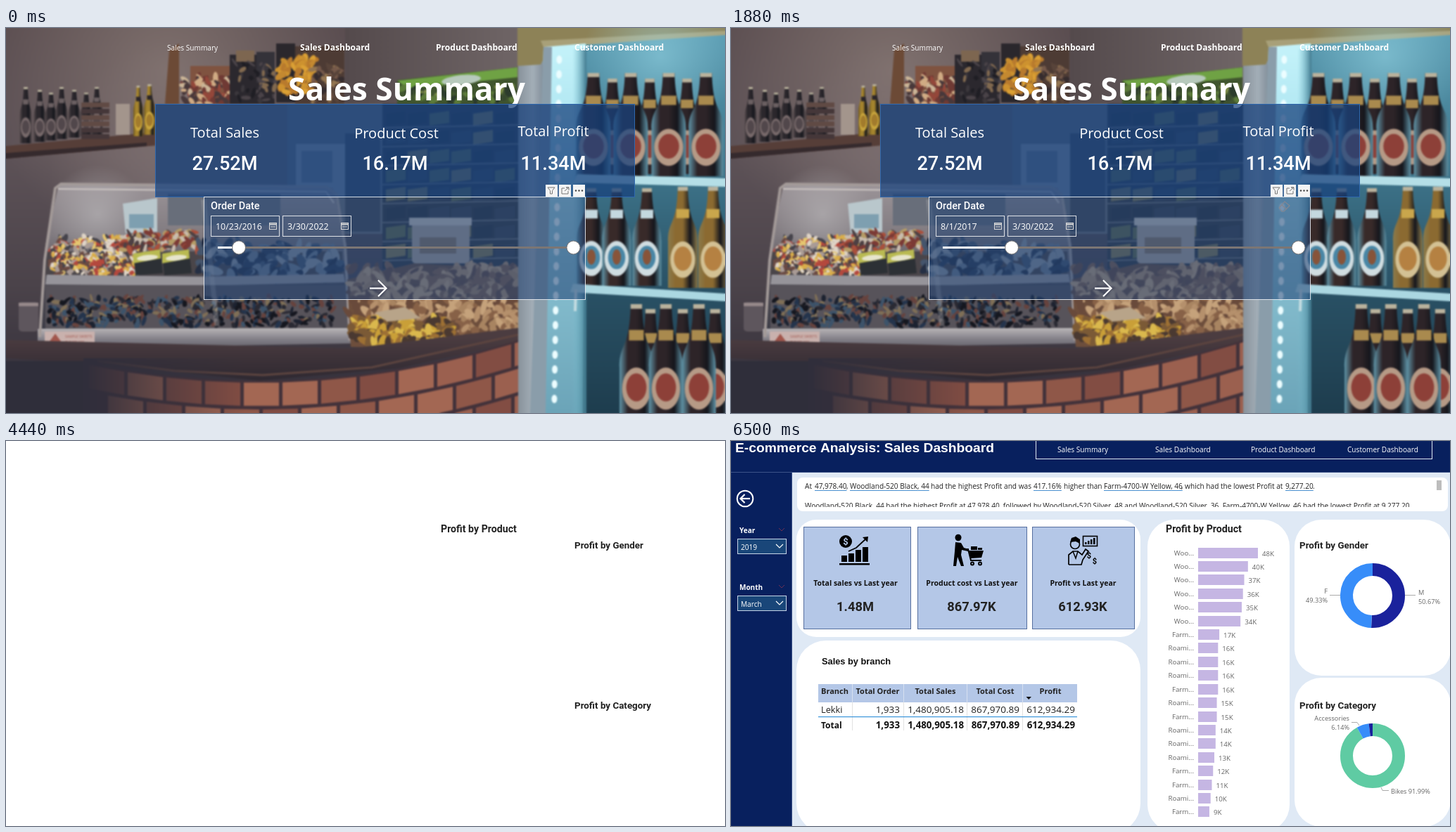
Write an HTML page with a canvas that moves like this. It is 1022 by 548 pixels and loops after 8000 ms.

```html
<!DOCTYPE html>
<html lang="en">
<head>
<meta charset="utf-8">
<title>Sales dashboard</title>
<style>
  html, body { margin: 0; width: 100%; height: 100%; overflow: hidden; background: #fff; }
  canvas { display: block; width: 100vw; height: 100vh; }
</style>
</head>
<body>
<canvas id="stage" width="1022" height="548"></canvas>
<script>
const W = 1022, H = 548, LOOP = 8000;
const SANS = '"Open Sans", sans-serif', DIN = 'Roboto, sans-serif', ARIAL = '"Liberation Sans", sans-serif';
const stage = document.getElementById('stage').getContext('2d');
let c = stage;

// Drawing helpers
function rect(x, y, w, h, fill) { c.fillStyle = fill; c.fillRect(x, y, w, h); }
function frame(x, y, w, h, color, width = 1) {
  c.strokeStyle = color; c.lineWidth = width; c.strokeRect(x + .5, y + .5, w, h);
}
function round(x, y, w, h, r, fill) {
  c.fillStyle = fill; c.beginPath(); c.roundRect(x, y, w, h, r); c.fill();
}
function trace(pts) {
  c.beginPath();
  for (let i = 0; i < pts.length; i += 2) c.lineTo(pts[i], pts[i + 1]);
}
function poly(pts, fill) { trace(pts); c.fillStyle = fill; c.fill(); }
function line(pts, color, width = 1) { trace(pts); c.strokeStyle = color; c.lineWidth = width; c.stroke(); }
function oval(x, y, rx, ry, fill, turn = 0) {
  c.fillStyle = fill; c.beginPath(); c.ellipse(x, y, rx, ry, turn, 0, 7); c.fill();
}
function ring(x, y, r, color, width) {
  c.strokeStyle = color; c.lineWidth = width; c.beginPath(); c.arc(x, y, r, 0, 7); c.stroke();
}
function text(str, x, y, size, color = '#fff', weight = 400, font = SANS, align = 'left') {
  c.font = `${weight} ${size}px ${font}`; c.fillStyle = color; c.textAlign = align;
  c.fillText(str, x, y);
}
function shade(x0, y0, x1, y1, ...colors) {
  const g = c.createLinearGradient(x0, y0, x1, y1);
  colors.forEach((color, i) => g.addColorStop(i / (colors.length - 1), color));
  return g;
}
function glow(x, y, r, color) {
  const g = c.createRadialGradient(x, y, 0, x, y, r);
  g.addColorStop(0, color); g.addColorStop(1, color.slice(0, 7) + '00');
  rect(x - r, y - r, 2 * r, 2 * r, g);
}
const ramp = (t, a, b) => Math.min(1, Math.max(0, (t - a) / (b - a)));

let seed = 7;
function random() { seed = (seed * 16807) % 2147483647; return seed / 2147483647; }
const pick = list => list[Math.floor(random() * list.length)];
function scatter(n, x, y, w, h, size, colors) {
  for (let i = 0; i < n; i++) {
    oval(x + random() * w, y + (i + random()) / n * h, size * (.6 + random()), size * (.35 + random() * .35),
      pick(colors), random() * 3);
  }
}

// Shop photograph, simplified
function bottle(x, top, base, w, { rim, glass, neck, label, badge }) {
  const h = base - top, s = top + h * .4;
  c.fillStyle = shade(x - w / 2, 0, x + w / 2, 0, rim, glass, glass, '#15161c', rim);
  c.beginPath();
  c.moveTo(x - w * .17, top);
  c.lineTo(x + w * .17, top);
  c.bezierCurveTo(x + w * .2, s, x + w / 2, s - h * .08, x + w / 2, s + h * .14);
  c.lineTo(x + w / 2, base);
  c.lineTo(x - w / 2, base);
  c.lineTo(x - w / 2, s + h * .14);
  c.bezierCurveTo(x - w / 2, s - h * .08, x - w * .2, s, x - w * .17, top);
  c.fill();
  rect(x - w * .17, top, w * .34, h * .04, '#b9b29d');
  rect(x - w * .22, top + h * .22, w * .44, h * .09, neck);
  oval(x, top + h * .72, w * .42, h * .18, label);
  oval(x, top + h * .71, w * .3, h * .12, badge);
}

function paintWall() {
  rect(0, 0, W, H, shade(0, 0, 0, H, '#5a4d50', '#5d5257', '#4b434a', '#302d39'));
  glow(230, 60, 260, '#97878099');
  glow(250, 210, 190, '#87797b88');

  poly([0, 168, 215, 148, 250, 152, 250, 164, 0, 186], '#563e38');
  poly([0, 178, 200, 163, 200, 168, 0, 186], '#352a2d');
  const dark = { rim: '#544a4c', glass: '#2b272c', neck: '#6b6062', label: '#77696a', badge: '#51474b' };
  const gold = { rim: '#6d5722', glass: '#a5842d', neck: '#2a252a', label: '#c8a53d', badge: '#a27b2c' };
  [28, 48, 64, 79, 97, 114, 129].forEach((x, i) => bottle(x, 84 + i % 3 * 4, 164 - i * 2, 17, dark));
  for (let y = 106; y < 152; y += 9) rect(107, y, 40, 7, pick(['#604a44', '#453739']));
  rect(156, 108, 20, 44, '#a3958c');
  bottle(188, 82, 154, 14, gold);
  bottle(204, 80, 152, 16, gold);
}

function paintRacks() {
  poly([232, 32, 246, 22, 246, 108, 226, 108], '#6c4a36');
  rect(262, 54, 62, 54, '#7f5340');
  scatter(70, 250, 70, 70, 38, 6, ['#d0ab84', '#94473a', '#cbb597', '#6f3a34', '#48383a']);
  rect(318, 38, 64, 70, '#2b282e');
  rect(327, 32, 26, 16, '#7d6650');
  rect(356, 34, 26, 44, '#343239');
  rect(384, 22, 27, 84, '#2a272c');
  rect(411, 26, 70, 82, '#4d3b34');
  scatter(40, 325, 48, 58, 56, 5, ['#3b373c', '#1f1e24', '#81694f', '#4a4348']);
  scatter(70, 390, 43, 50, 48, 7, ['#cd922f', '#dba034', '#b87a2d', '#c48930']);
  scatter(40, 435, 55, 42, 48, 6, ['#58443a', '#75594a', '#352c2e', '#937551']);
  rect(482, 0, 246, 110, shade(482, 0, 728, 0, '#544a4c', '#6f6566'));

  poly([556, 74, 727, 56, 727, 108, 556, 108], '#40552f');
  poly([556, 75, 727, 56, 727, 70, 572, 86], '#6fa244');
  scatter(35, 562, 84, 160, 22, 7, ['#5c7b3a', '#2c3b2c', '#82904d', '#38492f']);
  oval(647, 74, 28, 7, '#b7c9bc', -.1);

  rect(212, 108, 190, 132, '#6d6366');
  rect(400, 108, 135, 185, '#6c7077');
  rect(412, 165, 70, 75, '#9aa0a6');
  rect(420, 175, 44, 45, '#767e88');
  rect(482, 150, 50, 140, '#454a54');
  rect(535, 108, 195, 235, '#343840');
  for (let y = 118; y < 330; y += 27) {
    for (let x = 540; x < 726; x += 31) {
      poly([x, y + 4, x + 28, y, x + 28, y + 17, x, y + 21], pick(['#626a4a', '#3b414c', '#857a50', '#2c323b']));
    }
    line([535, y + 24, 730, y + 20], '#7b7d80', 1.5);
  }
  round(577, 277, 82, 58, 5, '#b0a59c');
  rect(573, 270, 89, 11, '#cfc8c0');
  rect(588, 298, 52, 23, '#8d7865');
}

function paintCase() {
  poly([75, 222, 465, 227, 480, 300, 488, 440, 48, 440, 56, 310], shade(0, 222, 0, 440, '#9b9498', '#817b80', '#4a474f', '#3a3a45'));
  glow(130, 265, 70, '#c0bec088');
  poly([166, 250, 215, 242, 215, 290, 170, 292], '#b9c7cc');
  rect(175, 265, 35, 20, '#7e9fb0');
  rect(230, 236, 160, 45, '#686e7a');
  rect(56, 318, 422, 34, '#4a4549');
  scatter(330, 62, 298, 130, 52, 5, ['#d9ad4a', '#b4483d', '#dfd4c6', '#45434b', '#e5c670', '#6b4a42', '#a99b95']);
  scatter(90, 165, 290, 112, 26, 6, ['#a9503c', '#7b3a35', '#b59c66', '#4d4043', '#c9bcae']);
  for (const x of [181, 222]) {
    poly([x, 321, x + 38, 315, x + 42, 349, x + 3, 352], '#2c3035');
    poly([x, 321, x + 38, 315, x + 39, 328, x, 335], '#b9ba52');
    oval(x + 20, 327, 15, 4, '#e7e5cd', -.1);
  }
  scatter(110, 275, 308, 195, 46, 10, ['#2c3a52', '#45556c', '#6d7c8e', '#252f44', '#8c95a0']);
  poly([58, 351, 275, 354, 480, 350, 482, 362, 275, 367, 56, 365], '#96949a');
  rect(56, 366, 430, 62, '#57535a');
  scatter(440, 60, 384, 405, 40, 5, ['#1c2230', '#24344c', '#3d536a', '#66433e', '#2a2a33', '#7f6f57', '#15171f']);
  poly([45, 428, 490, 427, 490, 449, 45, 457], shade(0, 427, 0, 457, '#bab6b8', '#85828a', '#5f5d66'));
  rect(55, 432, 71, 23, '#c9b1ad');
  poly([59, 450, 70, 435, 81, 450], '#a1564c');
  text('SAMPLE SWEETS', 84, 441, 5, '#a25850');
  text('PLEASE ASK', 84, 449, 5, '#a25850');
  c.lineJoin = 'round';
  line([48, 440, 55, 330, 70, 228, 78, 222, 455, 226, 470, 237, 482, 310, 489, 445], '#a39a98', 4);
  line([74, 229, 455, 233, 466, 249], '#cdc6c3', 2);
  line([281, 244, 300, 424], '#d2cdcb44', 7);
  round(18, 390, 28, 42, 5, '#5e565d');
  rect(18, 391, 28, 5, '#96888a');

  poly([485, 358, 580, 335, 732, 342, 732, 430, 600, 456, 490, 454], '#6d4e3c');
  scatter(320, 488, 340, 240, 92, 9, ['#a88461', '#c5a27b', '#876147', '#694a3b', '#b5906c']);
  scatter(150, 490, 414, 145, 36, 9, ['#c99f38', '#dab84d', '#9d7034', '#4a3931', '#7b5a36']);
  poly([524, 405, 567, 397, 590, 413, 542, 418], '#b8a489');
}

function paintCounter() {
  const edge = x => 500 - 60 * ((x - 360) / 375) ** 2;
  poly([0, 444, 490, 456, 735, 426, 735, 445, 560, 484, 360, 502, 130, 478, 0, 470], shade(0, 440, 0, 500, '#4b3c40', '#2f2931'));
  line([130, 474, 240, 488, 365, 494, 520, 483, 735, 435], '#5c443f', 3);
  rect(0, 474, 130, 74, '#2f2e3a');
  const wall = [120, H];
  for (let x = 120; x <= 735; x += 15) wall.push(x, edge(x) + 2);
  wall.push(735, H);
  poly(wall, '#43323a');
  for (let row = 0; row < 3; row++) {
    for (let x = 118 + row % 2 * 27; x < 734; x += 55) {
      const r = Math.min(x + 50, 734), y = row * 38 + 5;
      poly([x, edge(x) + y, r, edge(r) + y, r, edge(r) + y + 33, x, edge(x) + y + 33],
        pick(['#8f5748', '#9b604f', '#824d43', '#a36753']));
    }
  }
  rect(110, 470, 230, 78, shade(110, 0, 340, 0, '#302e3b', '#302e3b00'));
}

function paintFridge() {
  rect(728, 0, 294, H, shade(728, 0, 770, 0, '#88929b', '#a3aeb7', '#75838f'));
  poly([727, 0, W, 0, W, 20, 765, 42, 760, 52, 727, 54], '#8d8257');
  poly([760, 18, W, 4, W, 14, 765, 30], '#a8a079');
  poly([764, 28, W, 10, W, H, 760, H], shade(0, 0, 0, H, '#5b9cb2', '#417a90', '#2a5266', '#1e3d4e'));
  poly([764, 27, 824, 22, 820, H, 752, H], shade(0, 20, 0, H, '#c5f3fa', '#a4dfed', '#84bccd', '#6ba4b8'));
  poly([764, 27, 776, 27, 767, H, 745, H], '#8a9daa');
  for (let y = 45; y < H; y += 21) oval(787 - y / 70, y, 4, 6, '#ecfdff');
  rect(805, 30, 20, 518, shade(805, 0, 825, 0, '#79c1d200', '#41798e'));
  glow(930, 40, 110, '#a3e3f177');

  const rim = '#5f93a6', red = { rim, glass: '#2d2428', neck: '#a98a4e', label: '#b69a86', badge: '#8d4038' };
  const blue = { rim, glass: '#382a29', neck: '#c4d8df', label: '#d0dde1', badge: '#4986a5' };
  const amber = { rim: '#8a7a4c', glass: '#8b6a31', neck: '#c9a64c', label: '#d3c194', badge: '#b58142' };
  for (const x of [862, 915, 968]) bottle(x, 72, 208, 40, red);
  for (const x of [835, 888, 942, 995]) bottle(x, 64, 211, 49, red);
  poly([812, 208, W, 214, W, 226, 807, 220], '#b5dfe7');
  for (const x of [832, 868, 911]) {
    bottle(x, 228, 367, 41, blue);
    oval(x, 326, 6, 11, '#87543a');
  }
  for (const x of [962, 1005]) bottle(x, 226, 370, 42, amber);
  poly([806, 364, W, 378, W, 389, 802, 376], '#abd7e1');
  line([810, 372, 809, 403], '#c4dce1', 4);
  for (const x of [916, 962, 1008]) bottle(x, 400, 556, 42, red);
  for (const x of [896, 938, 985]) bottle(x, 393, 560, 48, red);
}

function paintPhoto() {
  paintWall();
  paintRacks();
  paintCase();
  paintCounter();
  paintFridge();
  c.filter = 'blur(1.2px)';
  c.drawImage(photo, 0, 0);
}

// Summary page
const DAY = 86400000;
const DRAG = [[1000, 0], [1150, 90], [1780, 249], [1810, 249], [1880, 282]];
function draggedDays(t) {
  for (let i = 1; i < DRAG.length; i++) {
    const [t0, a] = DRAG[i - 1], [t1, b] = DRAG[i];
    if (t < t1) return Math.round(a + (b - a) * ramp(t, t0, t1));
  }
  return 282;
}

function dateBox(x, label) {
  frame(x, 267, 97, 29, '#ffffffd0');
  text(label, x + 7, 287, 12.4);
  frame(x + 83, 277, 10, 9, '#d8d8d8');
  line([x + 83, 279.5, x + 94, 279.5], '#d8d8d8', 2);
  line([x + 85, 283, x + 92, 283], '#d8d8d8');
}

function handle(x) {
  oval(x, 312.5, 10, 10, '#77777a');
  oval(x, 312.5, 9, 9, '#fff');
}

function visualHeader() {
  for (const x of [767, 786, 806]) rect(x, 223, 17, 17, '#f4f4f4');
  line([770, 227, 780, 227, 776.5, 231.5, 776.5, 236, 773.5, 236, 773.5, 231.5, 770, 227], '#777');
  line([794, 228, 790, 228, 790, 236, 799, 236, 799, 232], '#777');
  line([794, 232, 800, 227, 796, 227, 800, 227, 800, 231], '#777');
  for (const x of [810, 814.5, 819]) oval(x, 231.5, 1.2, 1.2, '#444');
}

function summary(t) {
  const leave = ramp(t, 2830, 3040), updated = t >= 2260;
  c.drawImage(photo, 0, 0);

  text('Sales Summary', 229, 32, 10.1);
  text('Sales Dashboard', 418, 32, 12.05, '#fff', 700);
  text('Product Dashboard', 611, 32, 12.05, '#fff', 700);
  text('Customer Dashboard', 808, 32, 12.05, '#fff', 700);
  text('Sales Summary', 401, 103, 44.3, '#fff', 700);

  rect(212, 108, 682, 132, 'rgba(24,66,124,.74)');
  frame(212, 108, 681, 132, '#2f68ae');
  const figures = updated ? ['21.79M', '12.75M', '9.04M'] : ['27.52M', '16.17M', '11.34M'];
  [['Total Sales', 311, 156], ['Product Cost', 555, 157], ['Total Profit', 778, 154]].forEach(([label, x, y], i) => {
    text(label, x, y, 20, '#fff', 400, SANS, 'center');
    text(figures[i], i === 1 ? 553 : x, 202, 27.2, '#fff', 500, DIN, 'center');
  });

  rect(281, 240, 543, 147, 'rgba(32,66,116,.56)');
  frame(281, 240, 542, 146, `rgba(255,255,255,${.8 - .35 * leave})`);
  visualHeader();
  text('Order Date', 291, 258, 14.5, '#fff', 500, DIN);

  const days = draggedDays(t), x = 331 + days / 4.147;
  const start = new Date(Date.UTC(2016, 9, 23) + days * DAY);
  dateBox(291, `${start.getUTCMonth() + 1}/${start.getUTCDate()}/${start.getUTCFullYear()}`);
  dateBox(393, '3/30/2022');
  rect(301, 311, 505, 3, '#7c7674');
  rect(301, 311, x - 301, 3, '#fff');
  handle(x);
  handle(806.5);

  c.globalAlpha = ramp(t, 110, 620) * (1 - leave);
  line([779, 256, 787, 247, 794, 253, 786, 261, 783, 261, 779, 256], '#848791', 1.2);
  line([783, 252, 790, 258], '#848791', 1.2);
  c.globalAlpha = 1 - leave;
  line([517, 370.5, 540, 370.5], '#fff', 2.2);
  c.globalAlpha = 1 - .5 * leave;
  line([529, 359, 540.5, 370.5, 529, 382], '#fff', 2.2);
  c.globalAlpha = 1;

  if (t >= 3290) {
    frame(168, 8, 802, 39, '#ffffffd0');
    rect(953, 0, 17, 7, '#fff');
  }
}

// Dashboard page
const NAVY = '#08205e', INK = '#222', MUTED = '#666', CARD = '#b4c7e7';
const PROFITS = [48, 40, 37, 36, 35, 34, 17, 16, 16, 16, 16, 15, 15, 14, 14, 13, 12, 11, 10, 9];
const MODELS = { W: 'Woo...', F: 'Farm...', R: 'Roami...' };
const MODEL_ORDER = 'WWWWWWFRRRFRFRRRFFRF';
const BEST = 'Woodland-520 Black, 44', WORST = 'Farm-4700-W Yellow, 46';

function titles() {
  text('Profit by Product', 618, 130, 14.2, INK, 700, DIN);
  text('Profit by Gender', 808, 153, 13.4, INK, 700, DIN);
  text('Profit by Category', 808, 381, 13.4, INK, 700, DIN);
}

function donut(x, y, parts, grow) {
  let angle = -Math.PI / 2;
  for (const [share, color] of parts) {
    const next = angle + share * 2 * Math.PI * grow;
    c.strokeStyle = color; c.lineWidth = 18;
    c.beginPath(); c.arc(x, y, 37, angle, next); c.stroke();
    angle = next;
  }
}

function sidebar() {
  rect(0, 45, 87, H, NAVY);
  rect(86, 45, 1, H, '#3c5288');
  ring(20, 82, 11.3, '#fff', 2);
  line([27, 82, 14, 82], '#fff', 2.2);
  line([19.5, 76, 13.5, 82, 19.5, 88], '#fff', 2.2);
  [['Year', '2019', 131], ['Month', 'March', 212]].forEach(([label, value, y]) => {
    text(label, 12, y, 10, '#fff', 700);
    line([68, y - 7, 72, y - 3, 76, y - 7], '#6d3054');
    rect(10, y + 8, 69, 21, '#194679');
    frame(9, y + 8, 69, 21, '#c6d4e6');
    text(value, 14, y + 24, 10.1);
    line([64, y + 16, 69, y + 21, 74, y + 16], '#fff', 1.2);
  });
}

function narrative() {
  round(94, 52, 925, 48, 8, '#fff');
  rect(1003, 56, 7, 14, '#bdbdbd');
  const parts = [[105, 'At'], [119, '47,978.40', 1], [164, ','], [169, BEST, 1], [284, 'had the highest Profit and was'],
    [430, '417.16%', 1], [473, 'higher than'], [530, WORST, 1], [640, ', which had the lowest Profit at'],
    [788, '9,277.20', 1], [827, '.']];
  for (const [x, str, link] of parts) {
    text(str, x, 68, 10.1, INK);
    if (link) line([x, 70.5, x + c.measureText(str).width, 70.5], '#4a90d0');
  }
  c.save();
  c.beginPath(); c.rect(95, 80, 900, 14); c.clip();
  text(`${BEST} had the highest Profit at 47,978.40, followed by Woodland-520 Silver, 48 and ` +
    `Woodland-520 Silver, 36. ${WORST} had the lowest Profit at 9,277.20.`, 105, 95.5, 10.1, INK);
  c.restore();
}

function growthIcon() {
  oval(163, 143, 9, 9, '#000');
  text('$', 163, 148, 13, CARD, 700, DIN, 'center');
  [9, 12, 17, 21].forEach((h, i) => rect(157 + i * 10, 172 - h, 8, h, '#000'));
  rect(154, 174, 43, 2.5, '#000');
  line([167, 157, 178, 152, 192, 139], '#000', 1.8);
  poly([187, 137, 195, 136, 194, 144], '#000');
}

function cartIcon() {
  oval(323, 137.5, 4.5, 4.8, '#000');
  poly([319, 144, 327, 145, 331, 152, 338, 154, 337, 157, 328, 155, 327, 162, 331, 178, 327, 178, 322, 165, 320, 178, 316, 178, 318, 157], '#000');
  line([333, 154, 337, 154, 341, 170, 356, 170], '#000', 2);
  poly([338, 156, 359, 156, 356, 166, 341, 167], '#000');
  rect(341, 150, 9, 5, '#000');
  rect(351, 152, 6, 3, '#000');
  for (const x of [343, 354]) ring(x, 174.5, 2, '#000', 2);
}

function analystIcon() {
  ring(489, 147, 6.5, '#000', 1.6);
  poly([482, 144, 484, 138, 490, 136, 496, 140, 496, 146, 490, 143], '#000');
  line([480, 176, 480, 162, 486, 157, 493, 157, 499, 162, 504, 154, 508, 157, 500, 169, 498, 176, 480, 176], '#000', 1.7);
  line([486, 157, 490, 167, 493, 157], '#000', 1.5);
  frame(500, 135, 20, 14, '#000', 1.6);
  [3, 5, 7, 9].forEach((h, i) => rect(503 + i * 4, 147 - h, 2.5, h, '#000'));
  text('$', 509, 167, 11, '#000', 700, DIN, 'center');
  text('$', 517, 175, 11, '#000', 700, DIN, 'center');
}

function cards() {
  [[103, 153, 'Total sales vs Last year', '1.48M', 177], [265, 156, 'Product cost vs Last year', '867.97K', 342.5],
    [428, 146, 'Profit vs Last year', '612.93K', 500.5]].forEach(([x, w, label, value, mid]) => {
    rect(x, 122, w, 146, CARD);
    frame(x, 122, w - 1, 145, '#566f9f');
    text(label, mid, 206, 10.5, '#111', 700, SANS, 'center');
    text(value, mid - .5, 242, 18.3, INK, 700, DIN, 'center');
  });
  growthIcon(); cartIcon(); analystIcon();
}

function table() {
  text('Sales by branch', 129, 318, 12.8, '#111', 700, ARIAL);
  rect(124, 346, 368, 26, CARD);
  for (const x of [172, 245, 335, 414]) {
    rect(x, 346, 1, 26, '#d6e0f0');
    rect(x, 372, 1, 40, '#e1e1e1');
  }
  [['Branch', 147.5], ['Total Order', 208.5], ['Total Sales', 290.5], ['Total Cost', 375.5], ['Profit', 454]]
    .forEach(([label, x]) => text(label, x, 360, 11, INK, 700, SANS, 'center'));
  poly([419.5, 364, 427, 364, 423.2, 368], '#111');
  rect(124, 392, 368, 1.2, '#3a94db');
  text('Lekki', 128, 387, 12.8, INK);
  text('Total', 128, 409, 12, '#111', 700);
  [['1,933', 240], ['1,480,905.18', 331], ['867,970.89', 410], ['612,934.29', 489]].forEach(([value, x]) => {
    text(value, x, 387, 13.5, INK, 400, SANS, 'right');
    text(value, x, 409, 13.3, '#111', 700, SANS, 'right');
  });
}

function charts(grow) {
  PROFITS.forEach((value, i) => {
    const y = 159 + i * 19.42, w = value * 1.77 * grow;
    text(MODELS[MODEL_ORDER[i]], 658, y + 3.5, 9.7, MUTED, 400, SANS, 'right');
    rect(664, Math.round(y - 7.5), w, 15, '#c5b6e3');
    text(value + 'K', 664 + w + 6, y + 4.5, 9.7, MUTED);
  });

  donut(912, 220, [[.5067, '#1a229c'], [.4933, '#378df9']], grow);
  line([958, 219.5, 973, 219.5], '#aaa');
  line([851, 219.5, 866, 219.5], '#aaa');
  text('M', 977, 219, 9.2, MUTED);
  text('50.67%', 977, 232, 9.2, MUTED);
  text('F', 848, 217, 9.2, MUTED, 400, SANS, 'right');
  text('49.33%', 848, 230, 9.2, MUTED, 400, SANS, 'right');

  donut(912, 448, [[.9199, '#5fcba3'], [.0614, '#378df9'], [.0187, '#1a229c']], grow);
  line([882, 400.5, 890, 400.5, 893, 405], '#aaa');
  line([924, 493, 926, 497.5, 935, 497.5], '#aaa');
  text('Accessories', 879, 398, 9.2, MUTED, 400, SANS, 'right');
  text('6.14%', 879, 411, 9.2, MUTED, 400, SANS, 'right');
  text('Bikes 91.99%', 938, 501.5, 9.2, MUTED);
}

function dashboard(t) {
  rect(0, 0, W, H, '#dfe9f5');
  rect(0, 0, W, 45, NAVY);
  rect(0, 44, W, 1, '#3c5288');
  sidebar();
  text('E-commerce Analysis: Sales Dashboard', 6, 16, 19.25, '#fff', 700, ARIAL);
  [['Sales Summary', 464], ['Sales Dashboard', 603], ['Product Dashboard', 739], ['Customer Dashboard', 876]]
    .forEach(([label, x]) => text(label, x, 16, 10.1));
  if (t >= 6500) frame(433, -5, 563, 30, '#dfe5f0');

  round(93, 112, 489, 167, 28, '#fff');
  round(93, 284, 489, 274, 42, '#fff');
  round(592, 112, 202, 444, 38, '#fff');
  round(801, 112, 222, 222, 38, '#fff');
  round(801, 337, 222, 212, 38, '#fff');
  titles();
  if (t >= 4780) { narrative(); cards(); table(); }
  if (t >= 4810) charts(ramp(t, 4800, 4940));
}

const photo = document.createElement('canvas');
photo.width = W; photo.height = H;
c = photo.getContext('2d');
paintPhoto();
c = stage;

function draw() {
  const t = performance.now() % LOOP;
  if (t < 4440) summary(t);
  else if (t < 4750) { rect(0, 0, W, H, '#fff'); titles(); }
  else dashboard(t);
  requestAnimationFrame(draw);
}
draw();
</script>
</body>
</html>
```
